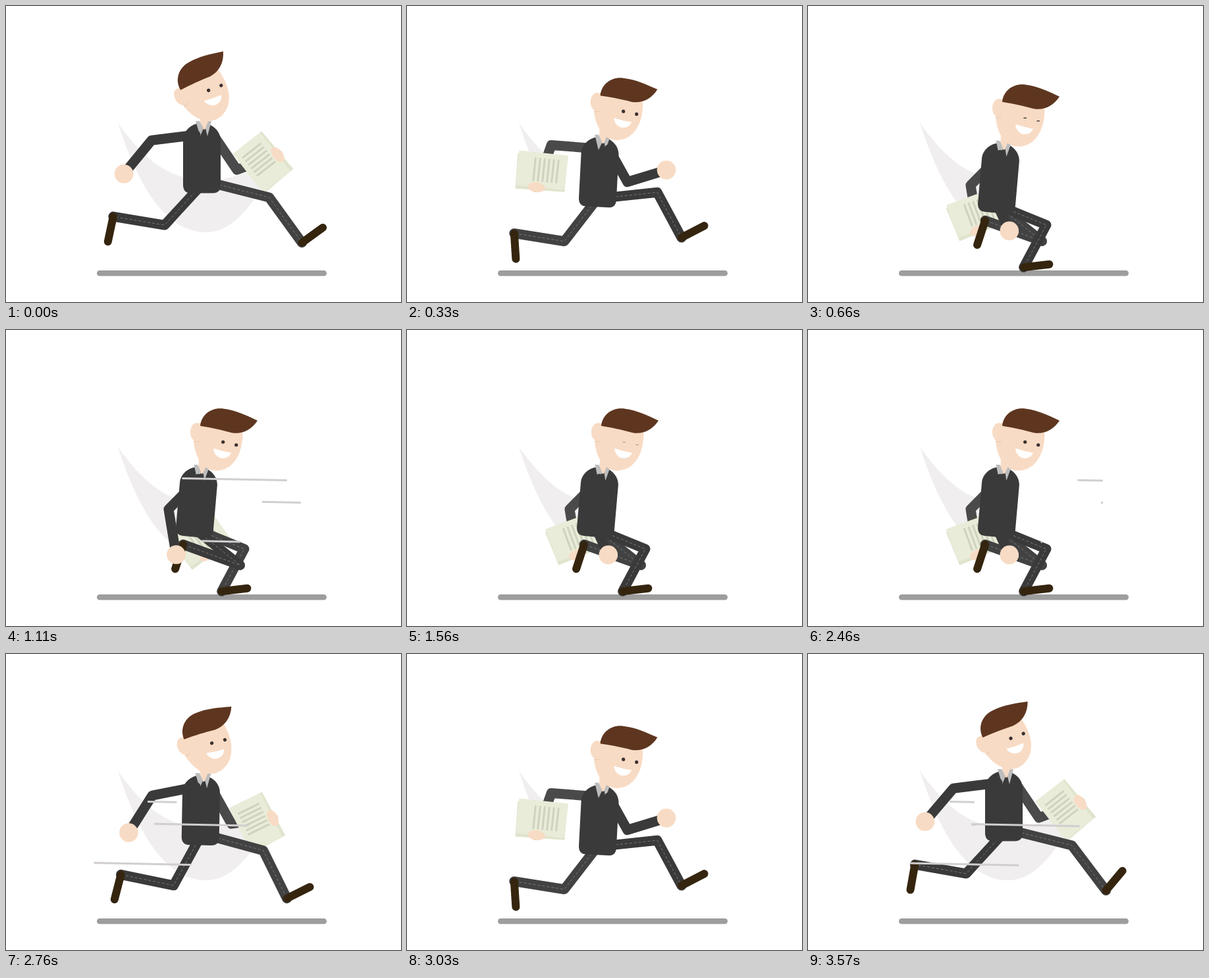
Write an HTML page that moves like this. It is 600 by 450 pixels and loops after 3600 ms.

```html
<!DOCTYPE html>
<html lang="en">
<head>
<meta charset="utf-8">
<title>Running office worker</title>
<style>
  html, body { margin: 0; width: 100%; height: 100%; overflow: hidden; background: #fff; }
  svg { display: block; width: 600px; height: 450px; }
  .limb { fill: none; stroke-width: 15; stroke-linejoin: round; stroke-linecap: round; }
  .near { stroke: #3a3a3a; }
  .far { stroke: #4a4a4a; }
  .farLeg { stroke: #424242; }
  .seam { fill: none; stroke: #787878; stroke-width: 1; stroke-dasharray: 4 3; }
  .shoe { stroke: #35250f; stroke-width: 12; stroke-linecap: round; }
  .skin { fill: #f8dbc4; }
  .speed { stroke: #d2cecf; stroke-width: 3; }
</style>
</head>
<body>
<svg viewBox="0 0 600 450">
  <defs><clipPath id="sweep"><path id="wedge"/></clipPath></defs>
  <rect x="138" y="402" width="349" height="8.6" rx="4.3" fill="#9d9d9d"/>
  <path clip-path="url(#sweep)" fill="#f1eeef"
    d="M170 178C205 226 240 262 300 265C330 266 362 256 394 240L392 270C365 318 335 344 305 344C240 344 200 270 170 178Z"/>

  <path id="farArm" class="limb far"/>
  <g id="paper">
    <rect x="-38" y="-24" width="75" height="54" fill="#e0e4cd" transform="rotate(-2)"/>
    <rect x="-37" y="-27" width="75" height="53" fill="#e9ecd8"/>
    <path id="bars" stroke="#cfd2bf" stroke-width="3"/>
    <ellipse class="skin" cx="-5" cy="26" rx="13" ry="7.5"/>
  </g>

  <g id="farLeg"><path class="limb farLeg"/><path class="seam"/><line class="shoe"/></g>
  <g id="nearLeg"><path class="limb near"/><path class="seam"/><line class="shoe"/></g>

  <g id="torso">
    <path fill="#3a3a3a" d="M-28 -68C-28 -82 -15 -94 0 -94C16 -94 29 -82 29 -68V0Q29 12.500 17 12.500H-16Q-28 12.500 -28 0Z"/>
    <path class="skin" d="M-2 -106H10V-88L4 -84L-2 -88Z"/>
    <path fill="#bdbdbd" d="M-9 -97H-3L3 -86L-2 -74ZM15 -97H10L6 -86L9 -74Z"/>
  </g>

  <g id="head">
    <ellipse class="skin" cx="289" cy="155.500" rx="10" ry="14"/>
    <path class="skin" d="M293 142L358 150C361 186 345 214 318 214C297 214 284 190 284 165Z"/>
    <path d="M284 169.500q5 1.500 9 0" fill="none" stroke="#e6cbb6" stroke-width="1"/>
    <path id="hair" fill="#5e3620" d="M294 146C296 128 312 117 330 120C347 122 364 130 381 138C372 152 358 159 342 156.500C326 152 312 149 294 146Z"/>
    <ellipse class="eye" cx="328.700" cy="170.500" rx="2.600" fill="#3a3030"/>
    <ellipse class="eye" cx="348.700" cy="175" rx="2.600" fill="#3a3030"/>
    <path fill="#fff" d="M314 180Q328 185 341 187C336 199 316 199 314 180Z"/>
  </g>

  <path id="nearArm" class="limb near"/>
  <circle id="fist" class="skin" r="14.300"/>
  <g id="lines"></g>
</svg>

<script>
const LOOP = 3600, CYCLE = 900, STEP = 450;
const $ = id => document.getElementById(id);
const rad = a => a * Math.PI / 180;

// phase, hip y shift, thigh angle, thigh length, shin angle, shin length, shoe angle
// angles are measured from straight down, positive = forward
const LEG = [
  [0, 0, -42.6, 83, -99.5, 79, -12],
  [210, 0, 51, 89, -110, 92, -18],
  [330, 0, 96, 91.5, 28, 78, 117],
  [420, -7, 76, 107, 37, 86, 140],
  [450, -7, 75.8, 106, 36, 85, 126],
  [660, 0, 68, 82, -27.6, 73, 97],
  [780, 0, -37.6, 82, -99, 77, 4],
  [870, 0, -42.6, 84, -100, 79, -10]
];
// phase, shoulder x shift, upper angle, upper length, forearm angle, forearm length
const ARM = [
  [0, -9, -83, 67.5, -39.5, 66],
  [210, 0, -45, 65, 9, 70],
  [330, 14, 29, 57, 107, 62],
  [420, 18, 34, 64, 110.5, 67],
  [450, 18, 34, 64, 110.5, 66],
  [660, 0, -10, 63, 25, 59],
  [780, -9, -94.5, 65, -19, 68],
  [870, -9, -83, 67.5, -40.5, 66.5]
];
// phase, hip x, hip y, lean, head turn, extra hair turn
const BODY = [
  [0, 297, 272, 0, -34, -3],
  [210, 286, 302, 5, 0, 0],
  [330, 289, 293, 3, -1, 0],
  [420, 297, 272, 0, -33.5, 0]
];
const SHEET = [[0, -128], [330, 6], [450, 8], [660, -20], [870, -128]];

// right end, left end, start times
const SPEED = [
  [[448, 229], [215, 224.5], [815, 1555, 2295, 3096]],
  [[448, 262.5], [214, 258], [920, 1656, 2390, 3250]],
  [[356, 322], [121, 317.3], [920, 1630, 2395, 3250]]
];
const SPEED_TIME = 640;

// periodic cubic that never overshoots its keys
function sample(keys, period, time) {
  const n = keys.length, p = ((time % period) + period) % period;
  const at = i => {
    const turn = Math.floor(i / n), k = keys[i - turn * n];
    return { k, t: k[0] + turn * period };
  };
  let i = n - 1;
  while (keys[i][0] > p) i--;
  const [a, b, c, d] = [at(i - 1), at(i), at(i + 1), at(i + 2)];
  const h = c.t - b.t, u = (p - b.t) / h;
  return b.k.slice(1).map((y0, j) => {
    const y1 = c.k[j + 1];
    const s0 = (y0 - a.k[j + 1]) / (b.t - a.t), s1 = (y1 - y0) / h;
    const s2 = (d.k[j + 1] - y1) / (d.t - c.t);
    const slope = (x, y) => x * y > 0 ? 2 * x * y / (x + y) : 0;
    const m0 = slope(s0, s1) * h, m1 = slope(s1, s2) * h;
    const u2 = u * u, u3 = u2 * u;
    return y0 * (2 * u3 - 3 * u2 + 1) + m0 * (u3 - 2 * u2 + u)
      + y1 * (3 * u2 - 2 * u3) + m1 * (u3 - u2);
  });
}

const move = ([x, y], angle, len) =>
  [x + len * Math.sin(rad(angle)), y + len * Math.cos(rad(angle))];
const poly = pts => 'M' + pts.map(p => p[0].toFixed(2) + ' ' + p[1].toFixed(2)).join('L');
const clamp = v => Math.max(0, Math.min(1, v));
const ease = v => v < .5 ? 4 * v ** 3 : 1 - 4 * (1 - v) ** 3;

function setLine(el, a, b) {
  el.setAttribute('x1', a[0]); el.setAttribute('y1', a[1]);
  el.setAttribute('x2', b[0]); el.setAttribute('y2', b[1]);
}

function drawLeg(group, time, [x, y]) {
  const [shift, ta, tl, sa, sl, fa] = sample(LEG, CYCLE, time);
  const hip = [x, y + shift], knee = move(hip, ta, tl), ankle = move(knee, sa, sl);
  const [cloth, seam, shoe] = group.children;
  const d = poly([hip, knee, ankle]);
  cloth.setAttribute('d', d);
  seam.setAttribute('d', d);
  setLine(shoe, ankle, move(ankle, fa, 39));
}

function drawArm(el, time, toStage) {
  const [sx, ua, ul, fa, fl] = sample(ARM, CYCLE, time);
  const shoulder = toStage(sx, -76), elbow = move(shoulder, ua, ul), hand = move(elbow, fa, fl);
  el.setAttribute('d', poly([shoulder, elbow, hand]));
  return hand;
}

function drawSweep(x, y) {
  const cx = 297, cy = 200, r = 600;
  const rim = a => [cx + r * Math.cos(a), cy + r * Math.sin(a)].join(' ');
  const from = Math.atan2(y - cy, x - cx), to = rad(197);
  const big = to - from > Math.PI ? 1 : 0;
  $('wedge').setAttribute('d', `M${cx} ${cy}L${rim(from)}A${r} ${r} 0 ${big} 1 ${rim(to)}Z`);
}

function drawSpeed(t) {
  SPEED.forEach(([a, b, starts], i) => {
    const el = $('lines').children[i];
    const begin = starts.find(s => t >= s && t <= s + SPEED_TIME);
    el.style.display = begin === undefined ? 'none' : '';
    if (begin === undefined) return;
    const u = (t - begin) / SPEED_TIME;
    const on = k => [a[0] + (b[0] - a[0]) * k, a[1] + (b[1] - a[1]) * k];
    setLine(el, on(ease(clamp((u - .25) / .75))), on(ease(clamp(u / .75))));
  });
}

function draw(t) {
  const [x, y, lean, turn, flick] = sample(BODY, STEP, t);
  const c = Math.cos(rad(lean)), s = Math.sin(rad(lean));
  const toStage = (px, py) => [x + px * c - py * s, y + px * s + py * c];

  $('torso').setAttribute('transform', `translate(${x} ${y}) rotate(${lean})`);
  const neck = toStage(4.5, -98);
  $('head').setAttribute('transform', `translate(${neck}) rotate(${turn}) translate(-298 -205)`);
  $('hair').setAttribute('transform', `rotate(${flick} 300 150)`);

  const open = Math.min(1, Math.abs(t - 690) / 90, Math.abs(t - 1550) / 90);
  document.querySelectorAll('.eye').forEach(e => e.setAttribute('ry', 2.6 * open));

  drawLeg($('farLeg'), t + STEP, [x, y]);
  drawLeg($('nearLeg'), t, [x, y]);

  const fist = drawArm($('nearArm'), t, toStage);
  $('fist').setAttribute('cx', fist[0]);
  $('fist').setAttribute('cy', fist[1]);

  const hand = drawArm($('farArm'), t + STEP, toStage);
  const [spin] = sample(SHEET, CYCLE, t);
  $('paper').setAttribute('transform', `translate(${hand}) rotate(${spin}) translate(5 -26)`);
  const pc = Math.cos(rad(spin)), ps = Math.sin(rad(spin));
  drawSweep(hand[0] + 5 * pc + 26 * ps, hand[1] + 5 * ps - 26 * pc);

  drawSpeed(t);
}

$('bars').setAttribute('d', Array.from({ length: 6 }, (_, i) => `M${-11 + 7 * i} -19v36`).join(''));
SPEED.forEach(() => {
  const el = document.createElementNS('http://www.w3.org/2000/svg', 'line');
  el.setAttribute('class', 'speed');
  $('lines').append(el);
});

function tick() {
  draw(performance.now() % LOOP);
  requestAnimationFrame(tick);
}
tick();
</script>
</body>
</html>
```
